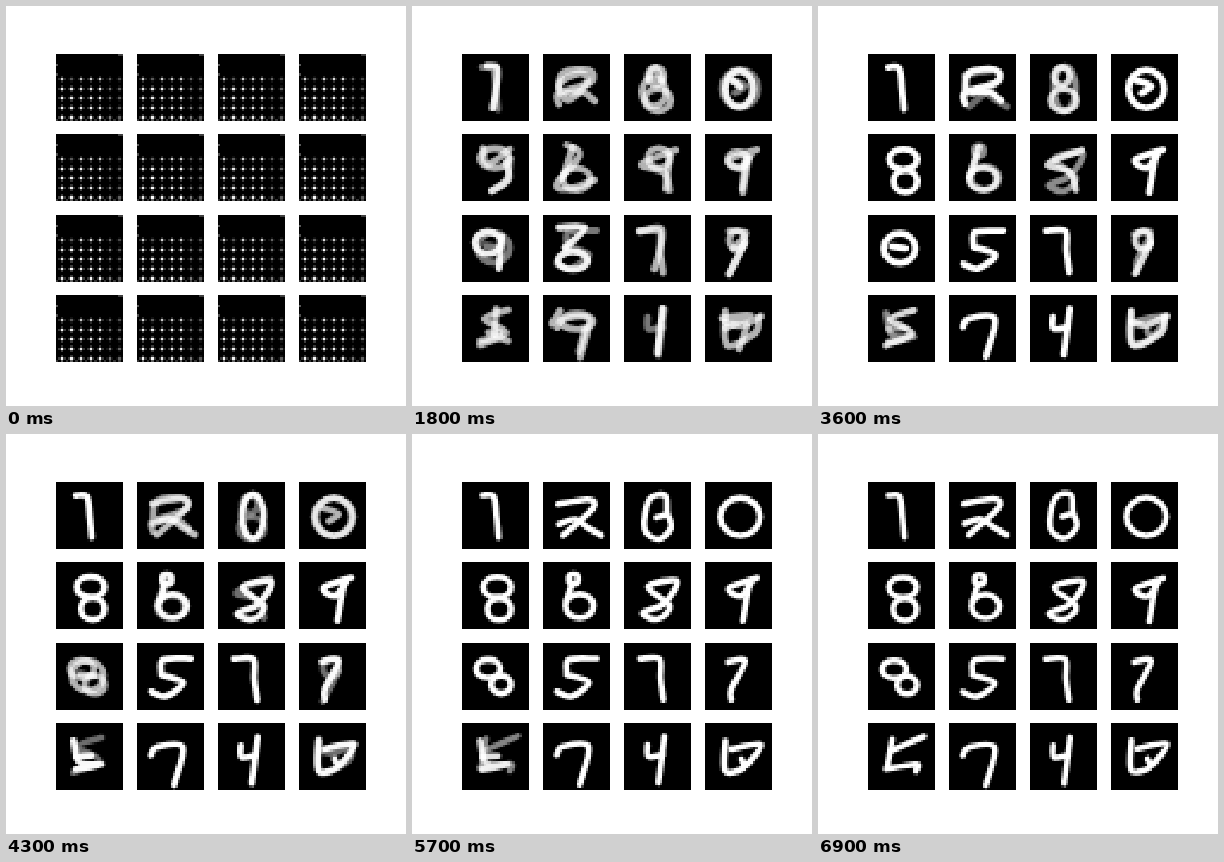
Recreate the animation shown at these times as an HTML page with a canvas. Size 400 by 400 pixels, loop 7000 ms.

```html
<!DOCTYPE html>
<html lang="en">
<head>
<meta charset="utf-8">
<title>Digits taking shape</title>
<style>
  html, body { margin: 0; width: 100%; height: 100%; overflow: hidden; background: #fff; }
  canvas { display: block; }
</style>
</head>
<body>
<canvas id="stage" width="400" height="400"></canvas>
<script>
const STEP = 100, STEPS = 70, TILE = 67, GRID = 28, FIRST = 9;
const stage = document.getElementById('stage').getContext('2d');
const sheet = Object.assign(document.createElement('canvas'), { width: GRID, height: GRID });
const pen = sheet.getContext('2d');
pen.lineCap = pen.lineJoin = 'round';
pen.fillStyle = pen.strokeStyle = '#fff';
stage.imageSmoothingEnabled = false;

// Repeatable value in 0..1
const rand = seed => {
  const v = Math.sin(seed * 12.9898 + 4.1) * 43758.5453;
  return v - Math.floor(v);
};

const ring = (x, y, rx, ry) => {
  const path = new Path2D();
  path.ellipse(x, y, rx, ry, 0, 0, 2 * Math.PI);
  return path;
};

// Smooth curve through points; closed when the ends meet
function line(...xy) {
  const path = new Path2D(), last = xy.length / 2 - 1;
  const point = i => [xy[2 * i], xy[2 * i + 1]];
  const closed = last > 1 && point(0).join() === point(last).join();
  const at = i => point(closed ? (i + last) % last : Math.max(0, Math.min(last, i)));
  path.moveTo(...at(0));
  for (let i = 0; i < last; i++) {
    const [a, b, c, d] = [at(i - 1), at(i), at(i + 1), at(i + 2)];
    path.bezierCurveTo(b[0] + (c[0] - a[0]) / 6, b[1] + (c[1] - a[1]) / 6,
      c[0] - (d[0] - b[0]) / 6, c[1] - (d[1] - b[1]) / 6, ...c);
  }
  return path;
}

const tiles = [];
const look = (step, ...paths) => ({ step, paths });
const tile = (...looks) => tiles.push(looks);

tile(look(9, line(25, 12, 35, 13, 35, 30, 31, 54)),
  look(36, line(20, 13, 31, 14, 34, 34, 36, 55)));
tile(look(9, line(16, 30, 37, 19, 45, 28, 25, 46, 16, 30)),
  look(27, line(16, 36, 20, 19, 46, 16, 48, 28, 16, 39, 16, 50), line(24, 39, 40, 38, 52, 47)),
  look(57, line(15, 22, 45, 17, 50, 26, 20, 53), line(16, 42, 32, 37, 46, 46, 58, 53)));
tile(look(9, ring(30, 38, 12, 14), line(24, 24, 31, 14, 38, 26)),
  look(27, ring(32, 22, 8, 9), ring(34, 46, 13, 11)),
  look(50, ring(35, 34, 11, 22)),
  look(57, line(25, 17, 41, 13, 43, 30, 47, 45, 34, 57, 20, 46, 25, 17), line(42, 32, 32, 35)));
tile(look(9, ring(34, 35, 14, 18), line(28, 27, 35, 33)),
  look(36, ring(35, 35, 18, 19), line(24, 26, 40, 32, 30, 39)),
  look(50, ring(35, 35, 20, 19)));
tile(look(9, ring(33, 24, 15, 10), line(48, 24, 45, 46, 30, 56)),
  look(27, line(21, 14, 26, 30, 48, 15), line(44, 28, 47, 45, 30, 57)),
  look(36, ring(35, 25, 14, 10), ring(37, 47, 12, 11)));
tile(look(9, line(24, 11, 37, 21, 14, 50, 26, 55, 52, 46)),
  look(27, line(30, 13, 20, 44), ring(34, 45, 14, 11)),
  look(50, ring(30, 17, 5, 5), line(28, 23, 23, 38), ring(36, 44, 14, 12)));
tile(look(9, ring(35, 24, 11, 10), line(46, 22, 42, 55)),
  look(27, line(52, 16, 18, 30, 40, 38, 46, 56)),
  look(50, line(53, 19, 24, 25, 46, 44, 34, 57, 19, 51, 40, 42, 53, 19)));
tile(look(9, ring(33, 26, 10, 8), line(41, 25, 37, 55)),
  look(27, line(52, 16, 24, 26, 36, 34, 48, 18), line(44, 24, 38, 59)));
tile(look(9, ring(26, 28, 13, 11), line(40, 22, 37, 54)),
  look(36, ring(32, 33, 16, 15), line(24, 31, 38, 33)),
  look(50, ring(26, 26, 12, 9), ring(39, 42, 10, 9)));
tile(look(9, line(16, 13, 42, 13, 22, 33), ring(30, 46, 15, 9)),
  look(36, line(54, 16, 26, 17, 24, 31), line(24, 32, 46, 40, 28, 54, 14, 49)));
tile(look(9, line(15, 16, 37, 13, 36, 34, 30, 54)),
  look(27, line(16, 16, 35, 16, 36, 36, 39, 57)));
tile(look(9, line(24, 16, 41, 18, 28, 34), line(38, 30, 24, 59)),
  look(27, ring(32, 25, 8, 9), line(40, 28, 24, 59)),
  look(50, line(23, 19, 40, 18, 26, 46, 26, 57)));
tile(look(9, line(34, 14, 32, 40), line(18, 46, 34, 43, 46, 46), line(26, 38, 38, 38)),
  look(27, line(46, 15, 22, 24, 44, 38, 18, 50)),
  look(50, line(18, 18, 24, 40, 46, 42, 20, 47), line(20, 34, 36, 33)),
  look(69, line(24, 16, 19, 44), line(22, 28, 56, 13), line(18, 46, 48, 41, 48, 48)));
tile(look(9, ring(34, 26, 16, 8), line(42, 34, 36, 56), line(9, 28, 17, 15)),
  look(27, line(14, 32, 20, 24, 46, 24, 37, 62)));
tile(look(9, line(38, 13, 36, 30, 33, 58)),
  look(36, line(40, 14, 34, 60), line(23, 22, 24, 34, 38, 32)));
tile(look(9, line(17, 23, 46, 20, 20, 33), line(42, 30, 34, 54)),
  look(27, line(20, 16, 22, 50, 50, 38, 54, 22), line(20, 27, 36, 30, 56, 21)),
  look(50, line(20, 18, 20, 48, 38, 45, 36, 36), line(26, 26, 56, 21, 42, 42)));

function drawLook({ paths }, alpha, width, dx = 0, dy = 0) {
  pen.save();
  pen.globalAlpha = Math.min(1, alpha);
  pen.scale(GRID / TILE, GRID / TILE);
  pen.translate(dx, dy);
  pen.lineWidth = width;
  paths.forEach(path => pen.stroke(path));
  pen.restore();
}

function dot(x, y, level, w = 1, h = 1) {
  pen.globalAlpha = level;
  pen.fillRect(x, y, w, h);
}

function drawLattice(index, fade) {
  for (let y = 10; y < GRID; y += 4) {
    for (let x = 2; x < GRID; x += 4) {
      const side = x > 24 ? .3 : x > 20 ? .4 : 1;
      const top = y > 10 ? 1 : x === 6 ? .3 : .8;
      const level = side * top * fade * (.85 + .15 * rand(index * 9 + x));
      dot(x - 1, y, level * .25, 3);
      dot(x, y - 1, level * .25, 1, 3);
      dot(x, y, level);
    }
  }
  for (let x = 0; x < GRID; x += 2) dot(x, 27, .2 * fade);
  dot(0, 4, .35 * fade);
  dot(0, 8, .3 * fade);
  dot(26, 0, .25 * fade, 2);
}

// Early steps: the lattice gives way to a rough, speckled first look
function drawStart(index, step) {
  const rough = 1 - step / FIRST, first = tiles[index][0];
  if (step < 3) drawLattice(index, 1 - step / 3);
  if (!step) return;
  drawLook(first, (1 - rough) * .8, 7 + rough * 9);
  drawLook(first, 1 - rough * .7, 7);
  for (let i = 0; i < rough * 50; i++) {
    const seed = index * 977 + step * 131 + i * 3;
    dot(Math.floor(2 + 24 * rand(seed)), Math.floor(3 + 22 * rand(seed + 1)), rand(seed + 2) * rough * .6);
  }
}

function drawTile(index, step) {
  pen.clearRect(0, 0, GRID, GRID);
  if (step < FIRST) return drawStart(index, step);
  const looks = tiles[index], width = 7.4 - step / 50;
  const dx = rand(index * 71 + step) - .5, dy = rand(index * 53 + step + 9) - .5;
  const next = looks.findIndex(item => item.step > step);
  if (next < 0) return drawLook(looks[looks.length - 1], 1, width, dx, dy);
  const from = looks[next - 1], to = looks[next];
  const mix = (step - from.step) / (to.step - from.step);
  drawLook(from, 1.4 * (1 - mix), width, dx, dy);
  drawLook(to, 1.4 * mix, width, dx, dy);
}

function render() {
  const step = Math.floor(performance.now() / STEP) % STEPS;
  stage.fillStyle = '#fff';
  stage.fillRect(0, 0, 400, 400);
  stage.fillStyle = '#000';
  tiles.forEach((_, i) => {
    const x = 50 + 81 * (i % 4), y = Math.round(48 + 80.4 * Math.floor(i / 4));
    drawTile(i, step);
    stage.fillRect(x, y, TILE, TILE);
    stage.drawImage(sheet, x, y, TILE, TILE);
  });
  requestAnimationFrame(render);
}
render();
</script>
</body>
</html>
```
